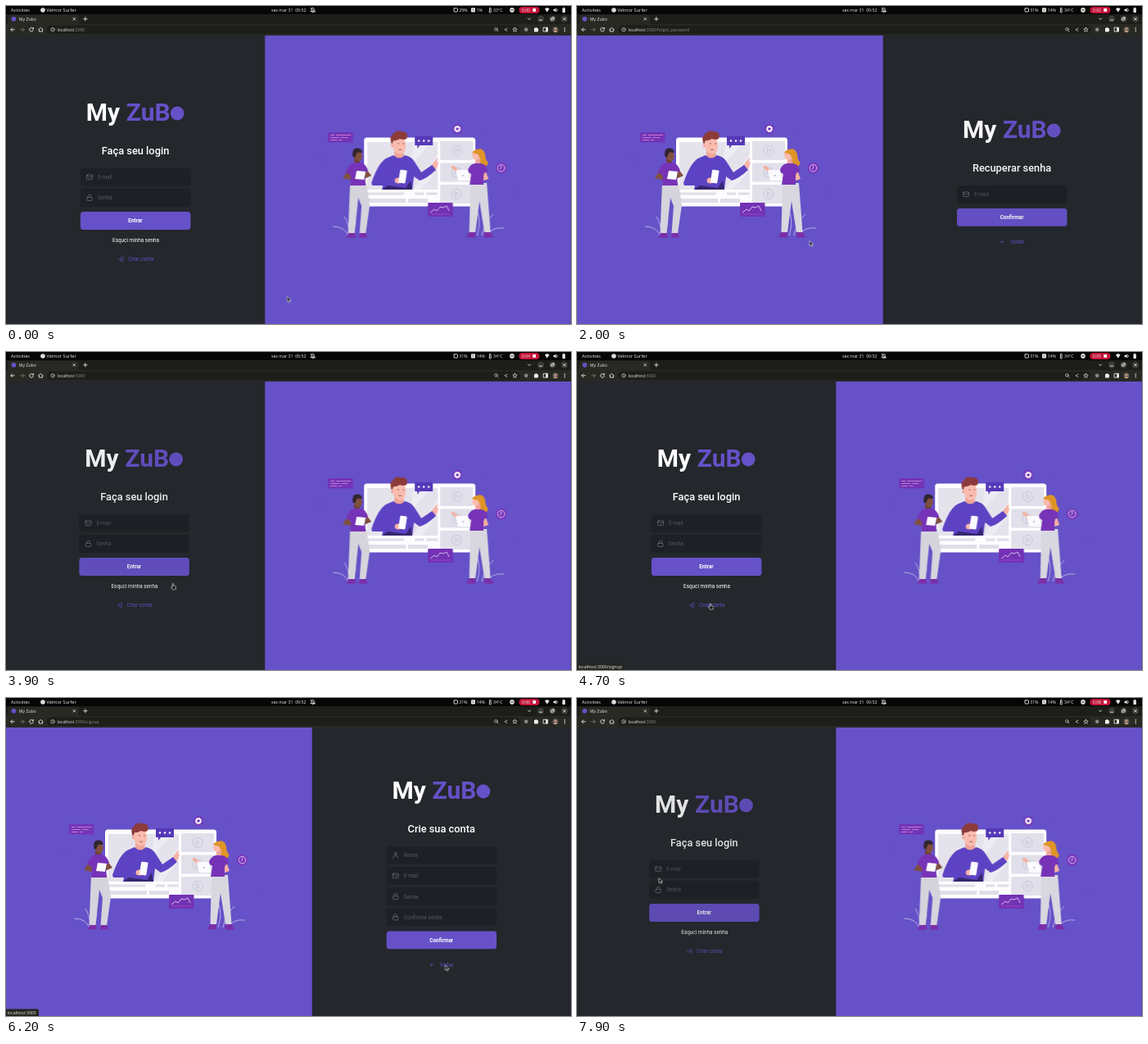
These frames come from a looping animation (690x388 px, 8000 ms). An HTML page:

```html
<!DOCTYPE html>
<html lang="pt-BR">
<head>
<meta charset="utf-8">
<title>My Zubo</title>
<style>
html, body { margin: 0; width: 100%; height: 100%; overflow: hidden; background: #24272c; }
svg { display: block; }
text { font-family: Roboto, sans-serif; font-size: 6.4px; fill: #fff; white-space: pre; }
.ui text { font-family: "Open Sans", "Noto Sans", sans-serif; font-size: 5.2px; fill: #ededed; }
.ui .wide { font-size: 5.6px; }
.ui .dim { fill: #8d8e89; }
.line { fill: none; stroke: #e4e4e0; stroke-width: .9; stroke-linecap: round; stroke-linejoin: round; }
.title { font-size: 30px; font-weight: 700; }
.head { font-size: 12.8px; font-weight: 500; text-anchor: middle; }
.btn { font-weight: 700; text-anchor: middle; }
.hint { fill: #575a61; }
.ico { fill: none; stroke: #777a80; stroke-width: .65; stroke-linecap: round; stroke-linejoin: round; }
.accent { fill: #6651c8; }
.ico.go { stroke: #6651c8; }

/* every animation shares one 8 s timeline */
.anim, .page, .enter { animation: 8s infinite step-end; }
.login { animation-name: login; }
.forgot { animation-name: forgot; }
.signup { animation-name: signup; }
.enter { animation-name: enter; }
.scene { animation-name: scene; }
.s1 { animation-name: s1; } .s2 { animation-name: s2; } .s3 { animation-name: s3; }
.early { animation-name: early; } .late { animation-name: late; }
.tick { animation-name: tick; }
.cursor { animation-name: move; }
.arrow { animation-name: arrow; } .hand { animation-name: hand; }

@keyframes login { 0%, 40.44%, 91.56%, 100% { visibility: visible } 15.38%, 62.38% { visibility: hidden } }
@keyframes forgot { 0%, 40.44%, 100% { visibility: hidden } 15.38% { visibility: visible } }
@keyframes signup { 0%, 91.56%, 100% { visibility: hidden } 62.38% { visibility: visible } }
@keyframes scene {
  0%, 40.44%, 91.56%, 100% { transform: translateX(316.25px) }
  15.38%, 62.38% { transform: none }
}
@keyframes enter {
  0%, 27.88%, 52.94%, 74.88% { opacity: 1; transform: none }
  15.38%, 40.44%, 62.38%, 91.56% { opacity: 0; transform: translateX(-20px); animation-timing-function: ease }
  100% { opacity: .8775; transform: translateX(-2.5px) }
}
@keyframes s1 { 0% { opacity: 0 } 11.5% { opacity: 1 } 19.1% { opacity: 1; animation-timing-function: linear } 21.6%, 100% { opacity: 0 } }
@keyframes s2 {
  0% { opacity: 0 } 31.2% { opacity: 1 } 44.2% { opacity: 1; animation-timing-function: linear } 46.7% { opacity: 0 }
  71.8% { opacity: 1 } 95.3% { opacity: 1; animation-timing-function: linear } 97.8%, 100% { opacity: 0 }
}
@keyframes s3 { 0% { opacity: 0 } 56.2% { opacity: 1 } 66.1% { opacity: 1; animation-timing-function: linear } 68.6%, 100% { opacity: 0 } }
@keyframes early { 0% { visibility: visible } 25%, 100% { visibility: hidden } }
@keyframes late { 0% { visibility: hidden } 25%, 100% { visibility: visible } }
@keyframes tick {
  0% { transform: none }
  8.75% { transform: none; animation-timing-function: steps(7, start) }
  96.24% { transform: translateY(-70px) }
  96.25%, 100% { transform: translateY(-80px) }
}
@keyframes move {
  0% { transform: translate(343.5px, 354.5px); animation-timing-function: ease-in-out }
  11.25% { transform: translate(161.5px, 287px) }
  20% { transform: translate(161.5px, 287px); animation-timing-function: ease-in-out }
  32.5% { transform: translate(529px, 285px) }
  41% { transform: translate(529px, 285px); animation-timing-function: ease-in-out }
  48.75% { transform: translate(204px, 282.5px); animation-timing-function: ease-in-out }
  56.25% { transform: translate(163px, 307px) }
  63.2% { transform: translate(163px, 307px); animation-timing-function: ease-in }
  67.5% { transform: translate(283.2px, 298px); animation-timing-function: ease-out }
  72.5% { transform: translate(536.5px, 326px) }
  92% { transform: translate(536.5px, 326px); animation-timing-function: ease-in-out }
  98.75%, 100% { transform: translate(100px, 219.5px) }
}
@keyframes arrow { 0%, 15.38%, 62.38%, 100% { visibility: visible } 10.6%, 47.9% { visibility: hidden } }
@keyframes hand { 0%, 15.38%, 62.38%, 100% { visibility: hidden } 10.6%, 47.9% { visibility: visible } }
</style>
</head>
<body>
<svg width="690" height="388" viewBox="0 0 690 388">
  <defs>
    <clipPath id="digits"><rect x="628" y="1" width="14" height="8"/></clipPath>
    <g id="play"><rect x="-20" y="-11.5" width="40" height="23" rx="1.5" fill="#e1e0ea"/><circle r="6" fill="none" stroke="#c5c2d6" stroke-width=".9"/><path d="M-1.8-2.8 3 0-1.8 2.8z" fill="none" stroke="#c5c2d6" stroke-width=".8"/></g>
    <g id="mail" class="ico"><rect x="-3.5" y="-2.8" width="7" height="5.6" rx=".8"/><path d="M-3.4-1.9 0 .7 3.4-1.9"/></g>
    <g id="lock" class="ico"><rect x="-3.2" y="-.5" width="6.4" height="4" rx=".8"/><path d="M-1.8-.5V-2a1.8 1.8 0 0 1 3.6 0v1.5"/></g>
    <g id="user" class="ico"><circle cy="-1.7" r="1.6"/><path d="M-2.8 3.2V2.6a2 2 0 0 1 2-1.7H.8a2 2 0 0 1 2 1.7v.6"/></g>
    <g id="enter" class="ico go"><path d="M-3 0H1M-.6-1.7 1 0-.6 1.7M1-2.8H2.8V2.8H1"/></g>
    <g id="back" class="ico go"><path d="M1.8 0H-1.8M-.3-1.6-1.8 0-.3 1.6"/></g>
  </defs>

  <rect width="690" height="388" fill="#24272c"/>

  <g class="scene anim">
    <rect y="36" width="373.75" height="352" fill="#6651c8"/>
    <g fill="none" stroke="#6d48c6" stroke-width=".7">
      <path d="M66 181h7v9h-7zM303 219h8M305 226h7M303 233h8M306 240h5M260 152h9M267 149v6"/>
    </g>
    <!-- plants -->
    <g fill="none" stroke="#d9d4f0" stroke-width=".7">
      <path d="M102 281Q98 269 83 269M103 280Q103 266 97 257M105 280Q110 272 111 263M259 280Q264 265 260 252M265 280Q268 264 279 254M270 281Q277 269 292 271"/>
    </g>
    <!-- board -->
    <rect x="121" y="160.5" width="136" height="84" rx="3.5" fill="#fdfdff"/>
    <rect x="125" y="166" width="86" height="58" fill="#e4e3ec"/>
    <path d="M182 166h21l-26 30zM211 181v18l-20 25h-10z" fill="#edecf4"/>
    <use href="#play" x="234" y="176.5"/><use href="#play" x="234" y="203"/><use href="#play" x="234" y="229.5"/>
    <g fill="#dfdee8">
      <rect x="125" y="227.5" width="45" height="3"/><rect x="183" y="227.5" width="11" height="3"/><rect x="197" y="227.5" width="14" height="3"/>
      <rect x="125" y="235" width="47" height="5"/><rect x="175" y="235" width="24" height="5"/>
    </g>
    <!-- presenter -->
    <path d="M158 175h11l1 10-5 4-7-4z" fill="#eda397"/>
    <path d="M205 198Q202 194 205 192L210 186Q212 186 210 190L212 191Q210 199 207 200z" fill="#f7b5a8"/>
    <path d="M130 216Q139 189 150 185L157 182Q164 189 171 182Q179 184 182 189L191 203 204 194 209 200Q197 211 189 213L182 208 180 224H143L144 219 131 219z" fill="#5d43c4"/>
    <path d="M143 224L150 219 172 222 178 213 180 224z" fill="#35266f"/>
    <path d="M156 163L170 161Q173 169 171.5 175Q169 182 163 180.5Q157 178 156 171z" fill="#f9bcae"/>
    <circle cx="155.5" cy="170.5" r="1.8" fill="#f2ab9f"/>
    <path d="M155 169Q151 159 156 157Q159 151 166 153Q176 153 173 162Q169 164 165 162Q159 165 157 164z" fill="#8c3b3a"/>
    <path d="M162 168h2M168 168h2M163 175q2 1 4 0" stroke="#733640" stroke-width=".7" fill="none"/>
    <ellipse cx="163" cy="213" rx="4.5" ry="3.6" fill="#f7b5a8"/>
    <rect x="164" y="200" width="8.5" height="16" rx="1.3" fill="#fafaff" transform="rotate(9 168 208)"/>
    <!-- floating cards -->
    <path d="M183 159h22v11h-16l-3 4v-4h-3z" fill="#5538b8"/>
    <g fill="#fff"><circle cx="188" cy="164.5" r="1.2"/><circle cx="194" cy="164.5" r="1.2"/><circle cx="200" cy="164.5" r="1.2"/></g>
    <rect x="77" y="154" width="30.5" height="12.5" rx="1" fill="#7334b8"/>
    <path d="M80 157.5h5m2 0h18M80 160.5h11m2 0h8M80 163.5h8m2 0h4" stroke="#ca83ce" stroke-width=".9"/>
    <circle cx="235" cy="150" r="6" fill="#7334b8"/>
    <circle cx="235" cy="150" r="2.6" fill="none" stroke="#fff" stroke-width="1.6"/>
    <circle cx="235" cy="150" r="3.9" fill="none" stroke="#fff" stroke-width="1" stroke-dasharray="1.5 1.56"/>
    <circle cx="288.5" cy="197.7" r="6.8" fill="#7a36bc"/>
    <g fill="none" stroke="#eadcf8" stroke-width=".8"><circle cx="288.5" cy="197.7" r="4.3"/><path d="M288.5 194.7v3l-1.5 1.5"/></g>
    <rect x="199" y="240" width="30.5" height="17" rx="1" fill="#7331b5"/>
    <path d="M202 252L207 248 210 250 214 245 218 246 222 244 225 250" fill="none" stroke="#f0e0fa" stroke-width=".8"/>
    <path d="M202 254h24" stroke="#a85bc7" stroke-width=".6"/>
    <!-- left figure -->
    <path d="M104 216H124L128 243 123 278H115.5L118 244 114 234 109.5 278H101.5z" fill="#d5d4dc"/>
    <path d="M102 277h8l1 5.5h-11zM115.5 277h7.5l2.5 5.5h-10.5z" fill="#7a2fa8"/>
    <path d="M109 185h7v8h-7z" fill="#6b4136"/>
    <path d="M103 198L95 210 110 213 112 209 103 206zM123 198L130 207 121 211 119 208z" fill="#80503e"/>
    <path d="M109 191H117Q123 192 126 201L122 204 123 219H104L105 206 99 203Q102 193 109 191z" fill="#7733b7"/>
    <ellipse cx="114" cy="183" rx="4.6" ry="6.2" fill="#80503e"/>
    <path d="M107.5 184Q105.500 174 112 173.500Q119 173.500 118.500 179L112.500 178.500 110 184.500z" fill="#30262f"/>
    <path d="M112 201l11 1-2 10-11-1z" fill="#fafaff"/>
    <!-- right figure -->
    <path d="M257 176Q266 171 269 181Q269 187 272.500 191Q272 197 265 196L260 186z" fill="#df9526"/>
    <path d="M251 216H271L275.500 276H268L262 238 257 276H249.500z" fill="#d8d7df"/>
    <path d="M249 276h8v6.500h-11zM268 276h7.500l4 6.500h-11.500z" fill="#7a2fa8"/>
    <path d="M257 184h6v10h-6z" fill="#eda397"/>
    <path d="M269 200L273 211 261 215 250 211 252 208 261 210 267 207z" fill="#f5b0a2"/>
    <path d="M256 192H264Q271 193 272 202L267 204V218H250L252 205 247 202Q250 193 256 192z" fill="#7733b7"/>
    <ellipse cx="257.500" cy="182" rx="4.300" ry="6" fill="#f9bcae"/>
    <path d="M253 179Q256 173.500 263 176L266 190 260 181z" fill="#df9526"/>
    <path d="M230 194l5 5 9 3-1 3-10-3-6-5z" fill="#f5b0a2"/>
    <path d="M233 200h15l3 13h-15z" fill="#fafaff"/><circle cx="242" cy="207" r="1" fill="#bab5cc"/>
  </g>

  <!-- desktop and browser bars -->
  <g class="ui">
    <rect width="690" height="10" fill="#060606"/>
    <rect y="10" width="690" height="12" fill="#1d1e1a"/>
    <rect y="22" width="690" height="14" fill="#282923"/>
    <path d="M1 22Q3 22 3 19V13Q3 11 5 11H87Q89 11 89 13V19Q89 22 91 22z" fill="#282923"/>
    <rect x="50" y="23.5" width="578" height="10.5" rx="5.2" fill="#1d1e1a"/>
    <text x="6" y="6.9" class="wide">Activities</text>
    <circle cx="45" cy="5" r="2.8" fill="#ddd"/>
    <text x="49.5" y="6.9" class="wide">Velmor Surfer</text>
    <text x="324" y="6.9">sex mar 31  09:52</text>
    <path class="line" d="M372.3 6.3q1-1 1-2.6a1.4 1.4 0 0 1 2.8 0q0 1.6 1 2.6zM374 7.7h1.2M372 2.3l5 5"/>
    <g class="line"><rect x="547" y="2.8" width="4.5" height="4.2" rx=".6"/><path d="M590.5 6V3a.8.8 0 0 1 1.6 0v3a1.2 1.2 0 1 1-1.6 0"/></g>
    <rect x="568" y="2.3" width="5" height="5.2" rx=".8" fill="#e4e4e0"/><path d="M569.5 3.7l2 2.3" stroke="#222" stroke-width=".7"/>
    <g class="early anim"><text x="553.3" y="6.9">29%</text><text x="574.5" y="6.9">1%</text><text x="595" y="6.9">33°C</text></g>
    <g class="late anim"><text x="553.3" y="6.9">31%</text><text x="574.5" y="6.9">14%</text><text x="595" y="6.9">34°C</text></g>
    <circle cx="618" cy="4.9" r="2.8" fill="#e4e4e0"/><path d="M616.5 4.9h3" stroke="#222"/>
    <rect x="626.5" y="1" width="25" height="8" rx="4" fill="#c4143a"/>
    <g clip-path="url(#digits)"><g id="clock" class="tick anim"></g></g>
    <rect x="643.3" y="3" width="3.8" height="3.8" fill="#fff"/>
    <g fill="#e8e8e5"><path d="M658 3.4q2.8-2.2 5.6 0l-2.8 4.1zM668.5 4h1.3l1.8-1.6v5.2l-1.8-1.6h-1.3z"/><rect x="679.5" y="2.5" width="3.4" height="5.5" rx=".5"/><path d="M680.4 1.8h1.6v1h-1.6z"/></g>
    <path class="line" d="M672.8 3.5q1.2 1.4 0 2.9"/>
    <circle cx="9.5" cy="15.8" r="2.9" fill="#6651c8"/>
    <text x="15.8" y="17.8">My Zubo</text>
    <g fill="#3b3c36"><circle cx="653" cy="15.8" r="4"/><circle cx="667.5" cy="15.8" r="4"/><circle cx="682" cy="15.8" r="4"/></g>
    <g class="line">
      <path d="M82 14.5l2.6 2.6m0-2.6L82 17.1M94.700 15.800h4.400m-2.200-2.200V18M637.500 15l1.600 1.700 1.600-1.700M651.300 17.200h3.400M680.700 14.500l2.600 2.600m0-2.600-2.600 2.600M665.800 14.900h2.400v2.400h-2.400zM667 14v-.200h2.300v2.400"/>
      <path d="M10.3 28.8H5.8m2-2-2 2 2 2M33.2 27.6a2.4 2.4 0 1 0 .2 2m0-3.2v1.6h-1.6M39.6 28.8l2.8-2.3 2.8 2.3M40.4 28.8v2.3h4v-2.3"/>
      <path stroke="#77786f" d="M17.8 28.8h4.5m-2-2 2 2-2 2"/>
      <g stroke-width=".6"><circle cx="57" cy="28.8" r="2.3"/><path d="M57 28.6v1.2M57 27.5v.1"/></g>
      <g stroke-width=".7">
        <circle cx="598.4" cy="28.3" r="1.7"/>
        <path d="M599.8 29.7l1.4 1.4M612 27.2l-3 1.6 3 1.7M621.5 26.2l.8 1.8 1.9.1-1.5 1.3.5 1.9-1.7-1.1-1.7 1.1.5-1.9-1.5-1.3 1.9-.1z"/>
      </g>
      <rect x="656.5" y="26.3" width="5" height="4.8"/>
    </g>
    <circle cx="635.2" cy="28.8" r="2.3" fill="#8a8b87"/>
    <path d="M645 27h1.4a1 1 0 0 1 2 0h1.3v1.5a1 1 0 0 1 0 1.8v1.2H645z" fill="#eee"/>
    <path d="M659.2 26.3h2.3v4.8h-2.3z" fill="#eee"/>
    <circle cx="671" cy="28.8" r="3.5" fill="#675a55"/><circle cx="671" cy="27.9" r="1.4" fill="#c99f8c"/><path d="M668.6 31.3q2.4-2.8 4.8 0-2.4 1.8-4.8 0z" fill="#c99f8c"/>
    <g fill="#e4e4e0"><circle cx="682.3" cy="26.8" r=".7"/><circle cx="682.3" cy="28.8" r=".7"/><circle cx="682.3" cy="30.8" r=".7"/></g>
  </g>

  <g id="pages"></g>
  <g id="status" class="ui"></g>

  <g class="cursor anim">
    <path class="arrow anim" d="M0 0V6.2L1.5 4.9 2.5 7.2 3.6 6.7 2.6 4.5H4.5z" fill="#111" stroke="#f4f4f4" stroke-width=".6" stroke-linejoin="round"/>
    <path class="hand anim" d="M-.8.6a.7.7 0 0 1 1.5 0V2.7L3 3.2Q3.8 3.5 3.6 4.6L3 7H-.5L-2.4 4.3Q-2.2 3.4-.8 4.4z" fill="#111" stroke="#f4f4f4" stroke-width=".65" stroke-linejoin="round"/>
  </g>
</svg>
<script>
const byId = id => document.getElementById(id);
const icon = (name, x, y) => `<use href="#${name}" x="${x}" y="${y}"/>`;
const text = (x, y, cls, str) => `<text x="${x}" y="${y}" class="${cls}">${str}</text>`;
const box = (y, attrs) => `<rect x="90.900" y="${y - 10.9}" width="134.500" height="21.800" rx="3.500" ${attrs}/>`;

const mail = ['mail', 'E-mail'], pass = ['lock', 'Senha'];
const back = { dy: 30, x: 156, icon: 'back', ix: 146.5, label: 'Voltar' };
const pages = [
  { name: 'login', x: 0, top: 140, path: '', head: 'Faça seu login', fields: [mail, pass], button: 'Entrar',
    links: [{ dy: 24, x: 130, label: 'Esquci minha senha' },
            { dy: 47, x: 149, icon: 'enter', ix: 140, label: 'Criar conta' }] },
  { name: 'forgot', x: 373.75, top: 161, path: '/forgot_password', head: 'Recuperar senha', fields: [mail],
    button: 'Confirmar', links: [back] },
  { name: 'signup', x: 373.75, top: 123, path: '/signup', head: 'Crie sua conta',
    fields: [['user', 'Nome'], mail, pass, ['lock', 'Confirmar senha']], button: 'Confirmar', links: [back] }
];

function field([glyph, label], y) {
  return box(y, 'fill="#1d2025"') + icon(glyph, 102, y) + text(112, y + 2.3, 'hint', label);
}

function link(l, y) {
  return (l.icon ? icon(l.icon, l.ix, y) : '') + text(l.x, y + 2.2, l.icon ? 'accent' : '', l.label);
}

function page(p) {
  const first = p.top + 68.8;
  const btn = first + (p.fields.length - 1) * 25.2 + 28;
  return `<g class="page ${p.name}">
    <g class="ui"><text x="62.5" y="30.7" style="font-size:5px">localhost<tspan class="dim">:3000${p.path}</tspan></text></g>
    <g transform="translate(${p.x})"><g class="enter">
      ${text(97.8, p.top, 'title', 'My')}${text(146.800, p.top, 'title accent', 'ZuB')}
      <circle cx="209.200" cy="${p.top - 9}" r="8.400" class="accent"/>
      ${text(158, p.top + 41.4, 'head', p.head)}
      ${p.fields.map((f, i) => field(f, first + i * 25.2)).join('')}
      ${box(btn, 'class="accent"')}
      ${text(158, btn + 2.3, 'btn', p.button)}
      ${p.links.map(l => link(l, btn + l.dy)).join('')}
    </g></g></g>`;
}

const bubble = (cls, w, path) => `<g class="${cls} anim"><path d="M0 379.5H${w - 1.5}q1.5 0 1.5 1.5V388H0z" fill="#25261f"/>
  ${text(1.8, 385.8, '', 'localhost:3000' + path)}</g>`;

byId('pages').innerHTML = pages.map(page).join('');
byId('status').innerHTML = bubble('s1', 84, '/forgot_password') + bubble('s2', 40, '') + bubble('s3', 59, '/signup');
byId('clock').innerHTML = Array.from({ length: 9 }, (_, i) => text(629.8, 6.9 + i * 10, '', '0:0' + i)).join('');
</script>
</body>
</html>
```
